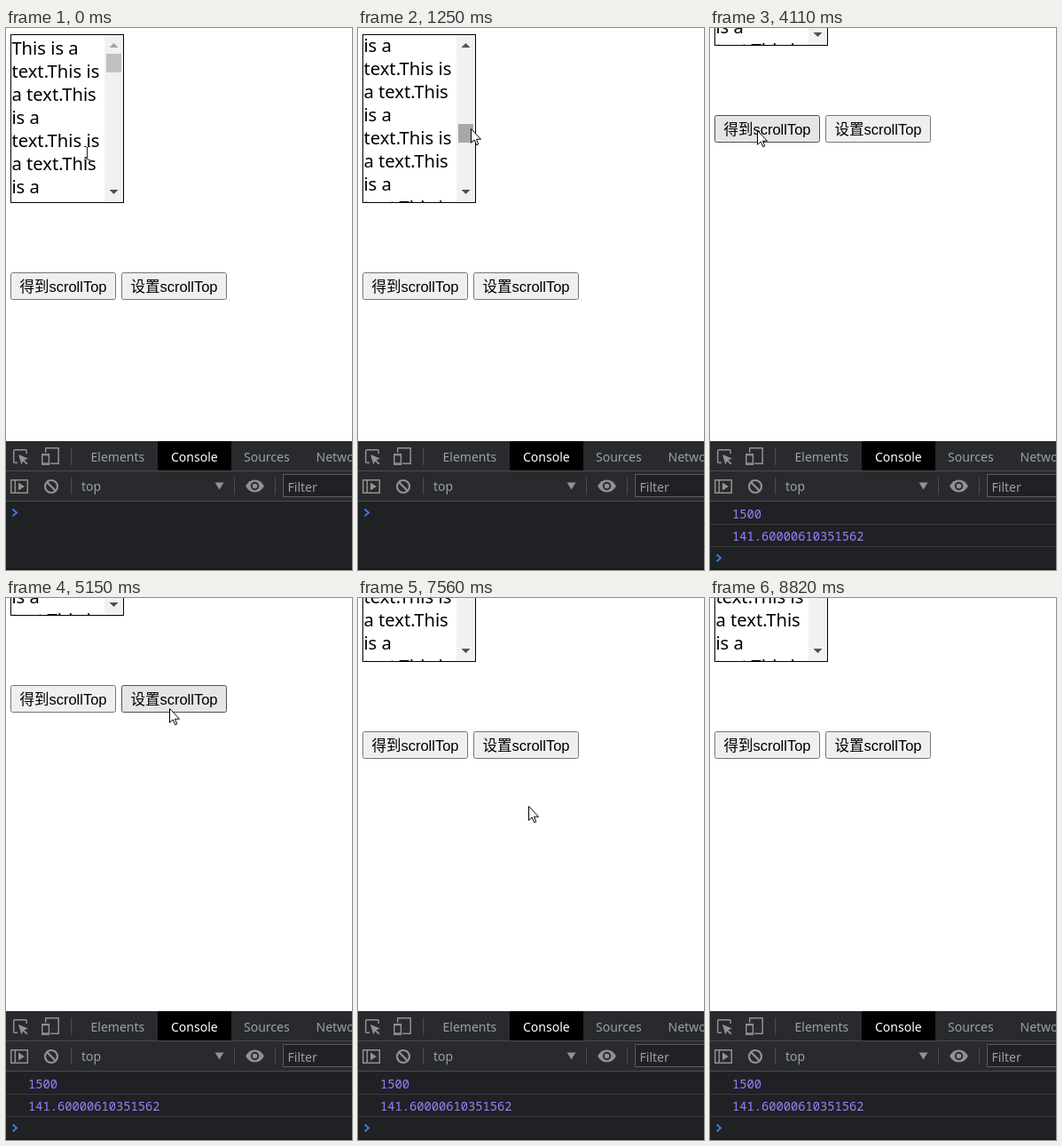
An HTML page for the animation above (9.37 s loop, 390 by 610 pixels).

```html
<!DOCTYPE html>
<html lang="en">
<head>
<meta charset="utf-8">
<title>scrollTop demo</title>
<style>
  html, body { margin: 0; width: 100%; height: 100%; overflow: hidden; background: #fff; }
  #stage { position: relative; width: 390px; height: 610px; overflow: hidden; }
  #view { position: absolute; width: 390px; height: 465px; overflow: hidden; background: #fff; }
  #page { position: absolute; inset: 0; }

  #box {
    position: absolute; left: 5px; top: 7px; width: 126px; height: 188px;
    border: 1px solid #000; overflow: hidden;
  }
  #text {
    position: absolute; left: .4px; top: 1px; white-space: pre; color: #000;
    font: 20.2px/26px "Noto Sans", "Open Sans", sans-serif;
  }
  #bar { position: absolute; left: 105px; top: 0; width: 21px; height: 188px; background: #f1f1f1; }
  #bar svg { position: absolute; left: 0; top: 0; }
  #thumb { position: absolute; left: 2px; top: 21px; width: 17px; height: 21px; background: #c1c1c1; }
  #thumb.hover { background: #a8a8a8; }
  #thumb.active { background: #787878; }

  .btn {
    position: absolute; top: 275px; width: 119px; height: 31px; box-sizing: border-box;
    border: 1px solid #767676; border-radius: 2.5px; background: #efefef; color: #000;
    font: 16.5px/30px "Liberation Sans", "Noto Sans CJK SC", "Noto Sans CJK", sans-serif;
    text-align: center; white-space: nowrap;
  }
  .btn.hover { background: #e5e5e5; border-color: #4f4f4f; }
  .btn.active { background: #f5f5f5; border-color: #8d8d8d; }

  #tools { position: absolute; left: 0; top: 465px; }
  #tools text { font: 14px "Noto Sans", "Open Sans", sans-serif; fill: #9aa0a6; }
  #tools .log text { font: 13.75px "Noto Sans Mono", "DejaVu Sans Mono", monospace; fill: #9980ff; }
  .rule { stroke: #494c50; }
  .icon { fill: none; stroke: #919191; stroke-width: 1.5; }
  .solid { fill: #919191; }
  #cursor { position: absolute; left: 0; top: 0; overflow: visible; }
</style>
</head>
<body>
<div id="stage">
  <div id="view">
    <div id="page">
      <div id="box">
        <div id="text"></div>
        <div id="bar">
          <svg width="21" height="188">
            <path id="up" d="M5.5 14L10.5 9L15.5 14Z"/>
            <path d="M5.5 174L10.5 179L15.5 174Z" fill="#505050"/>
          </svg>
          <div id="thumb"></div>
        </div>
      </div>
      <div class="btn" style="left:5px">得到scrollTop</div>
      <div class="btn" style="left:130px">设置scrollTop</div>
    </div>
  </div>

  <svg id="tools" width="390" height="145" viewBox="0 465 390 145">
    <rect y="465" width="390" height="145" fill="#202124"/>
    <rect y="465" width="390" height="67" fill="#292a2d"/>
    <rect x="171" y="465" width="83" height="33" fill="#000"/>
    <path class="rule" d="M0 498.5H390M0 532.5H390M73.5 472V492M73.5 506V525M257.5 506V525M303.5 506V525"/>
    <rect x="312.5" y="502.5" width="90" height="25" fill="#202124" stroke="#5a5d61"/>
    <rect y="608" width="390" height="2" fill="#18191c"/>

    <text x="95.5" y="488">Elements</text>
    <text x="186" y="488" style="fill:#fff">Console</text>
    <text x="268" y="488">Sources</text>
    <text x="349.5" y="488">Network</text>
    <text x="85" y="521">top</text>
    <text x="317.5" y="522">Filter</text>

    <!-- inspect, device -->
    <path class="icon" d="M13 489.2H9.8Q8.7 489.2 8.7 488V476Q8.7 474.8 9.8 474.8H22Q23.2 474.8 23.2 476V479"/>
    <path class="solid" d="M14 480L25 484.4L20.6 486.2L24.6 490.2L23.2 491.6L19.2 487.6L17.4 491.6Z"/>
    <path class="icon" d="M44.7 478V472.8H59.2V490.2H50"/>
    <rect class="icon" x="40.8" y="479.8" width="7.6" height="11.4"/>
    <path class="icon" d="M41 480.5H48M41 490H48"/>

    <!-- sidebar, clear, context arrow, eye -->
    <path class="icon" d="M5.7 508.7H24.3V523.3H5.7ZM10.3 508.7V523.3"/>
    <path class="solid" d="M14 511.5L21 516L14 520.5Z"/>
    <g class="icon" style="stroke-width:2.2"><circle cx="51" cy="516" r="7"/><path d="M46 511L56 521"/></g>
    <path class="solid" d="M235.5 511.5H245.5L240.5 519.5Z"/>
    <path class="solid" d="M270 515.5Q274 508.5 280.5 508.5T291 515.5Q287 522.5 280.5 522.5T270 515.5Z"/>
    <circle cx="280.5" cy="515.5" r="4.7" fill="#292a2d"/>
    <circle class="solid" cx="280.5" cy="515.5" r="2.8"/>

    <g id="log" class="log">
      <path stroke="#3a3a3a" d="M0 558.5H390M0 583.5H390"/>
      <text x="25" y="552">1500</text>
      <text x="25" y="577">141.60000610351562</text>
    </g>
    <path id="prompt" d="M7.5 541.5L12 545.5L7.5 549.5" fill="none" stroke="#3b7de0" stroke-width="1.9"/>
  </svg>

  <svg id="cursor" width="1" height="1">
    <path id="arrow" d="M.5 .5V16.2L4.2 12.9L6.7 18.7L8.8 17.8L6.4 12.2H11.5Z" fill="#fff" stroke="#000"/>
    <path id="beam" d="M-3 -7.5H-1L.5 -6.5L2 -7.5H4M.5 -6.5V6.5M-3 7.5H-1L.5 6.5L2 7.5H4" fill="none" stroke="#222"/>
  </svg>
</div>

<script>
const LOOP = 9370, STEP = 70;
const LINE = 26, CYCLE = 3 * LINE;            // the text repeats every three lines
const MAX_SCROLL = 2967, TRAVEL = 125;        // inner scroll range, thumb range
const SET_TO = 125, SPACING = 125;            // page scroll set by button two, button pitch
const DRAG = { from: 740, to: 1190 };
const GET = 4060, SET = 5740, SET_AGAIN = 8400, HOLD = 150;

const $ = id => document.getElementById(id);
const buttons = [...document.querySelectorAll('.btn')];
const lines = ['is a', 'text.This is', 'a text.This'];
$('text').textContent = Array.from({ length: 121 },
  (_, i) => i ? lines[i % 3] : 'This is a').join('\n');

function ease(t, from, to) {
  const f = Math.min(1, Math.max(0, (t - from) / (to - from)));
  return f * f * (3 - 2 * f);
}

// A value that glides to each goal in turn and rests in between
class Glide {
  constructor(...start) { this.start = start; this.legs = []; }
  to(from, end, ...goal) { this.legs.push({ from, end, goal }); return this; }
  at(t) {
    return this.legs.reduce((now, { from, end, goal }) => {
      const f = ease(t, from, end);
      return now.map((v, i) => v + (goal[i] - v) * f);
    }, this.start).map(Math.round);
  }
}

const pointer = new Glide(91, 141)
  .to(0, 340, 78, 110)
  .to(420, DRAG.from, 122, 34)
  .to(DRAG.from, DRAG.to, 127, 113)
  .to(1250, 1400, 211, 128)
  .to(1400, 1810, 230, 125)
  .to(3500, 3900, 53, 115)
  .to(GET, 4460, 168, 113)
  .to(4460, 4830, 200, 246)
  .to(4830, 5150, 183, 119)
  .to(5900, 6300, 236, 202)
  .to(6300, 6870, 207, 348)
  .to(6870, 7540, 192, 234)
  .to(SET_AGAIN, 8820, 395, 675);

const page = new Glide(0)
  .to(1400, 1810, 302)
  .to(2600, 2660, 300)
  .to(2660, 3370, 177)
  .to(SET - 1, SET, SET_TO)
  .to(7560, 7900, 45)
  .to(SET_AGAIN - 1, SET_AGAIN, SET_TO);

const inner = new Glide(0)
  .to(DRAG.from, DRAG.to, 24 * CYCLE + 3)
  .to(1250, 1400, 22 * CYCLE + 3);

const shiftY = (el, y) => { el.style.transform = `translateY(${y}px)`; };
const show = (el, on) => { el.style.display = on ? '' : 'none'; };
const inside = (x, y, l, t, w, h) => x >= l && x < l + w && y >= t && y < t + h;

function setState(el, over, down) {
  el.classList.toggle('hover', over && !down);
  el.classList.toggle('active', over && down);
}

function draw(time) {
  const t = Math.floor(time / STEP) * STEP;
  const [x, y] = pointer.at(t);
  const [top] = page.at(t);
  const [scroll] = inner.at(t);
  const offset = Math.round(scroll / MAX_SCROLL * TRAVEL);
  const dragging = t >= DRAG.from && t < DRAG.to;
  const clicking = [GET, SET, SET_AGAIN].some(up => t >= up - HOLD && t < up);
  const py = y + top;

  shiftY($('page'), -top);
  shiftY($('text'), -scroll);
  shiftY($('thumb'), offset);
  $('up').setAttribute('fill', scroll ? '#505050' : '#a3a3a3');
  setState($('thumb'), dragging || inside(x, py, 113, 29 + offset, 17, 21), dragging);
  buttons.forEach((b, i) => setState(b, inside(x, py, 5 + SPACING * i, 275, 119, 31), clicking));

  const logged = t >= GET;
  show($('log'), logged);
  $('prompt').setAttribute('transform', `translate(0 ${logged ? 51 : 0})`);

  const overText = inside(x, py, 6, 8, 105, 188);
  show($('beam'), overText);
  show($('arrow'), !overText);
  $('cursor').style.transform = `translate(${x}px, ${y}px)`;
}

const begin = performance.now();
function tick() {
  draw((performance.now() - begin) % LOOP);
  requestAnimationFrame(tick);
}
tick();
</script>
</body>
</html>
```
